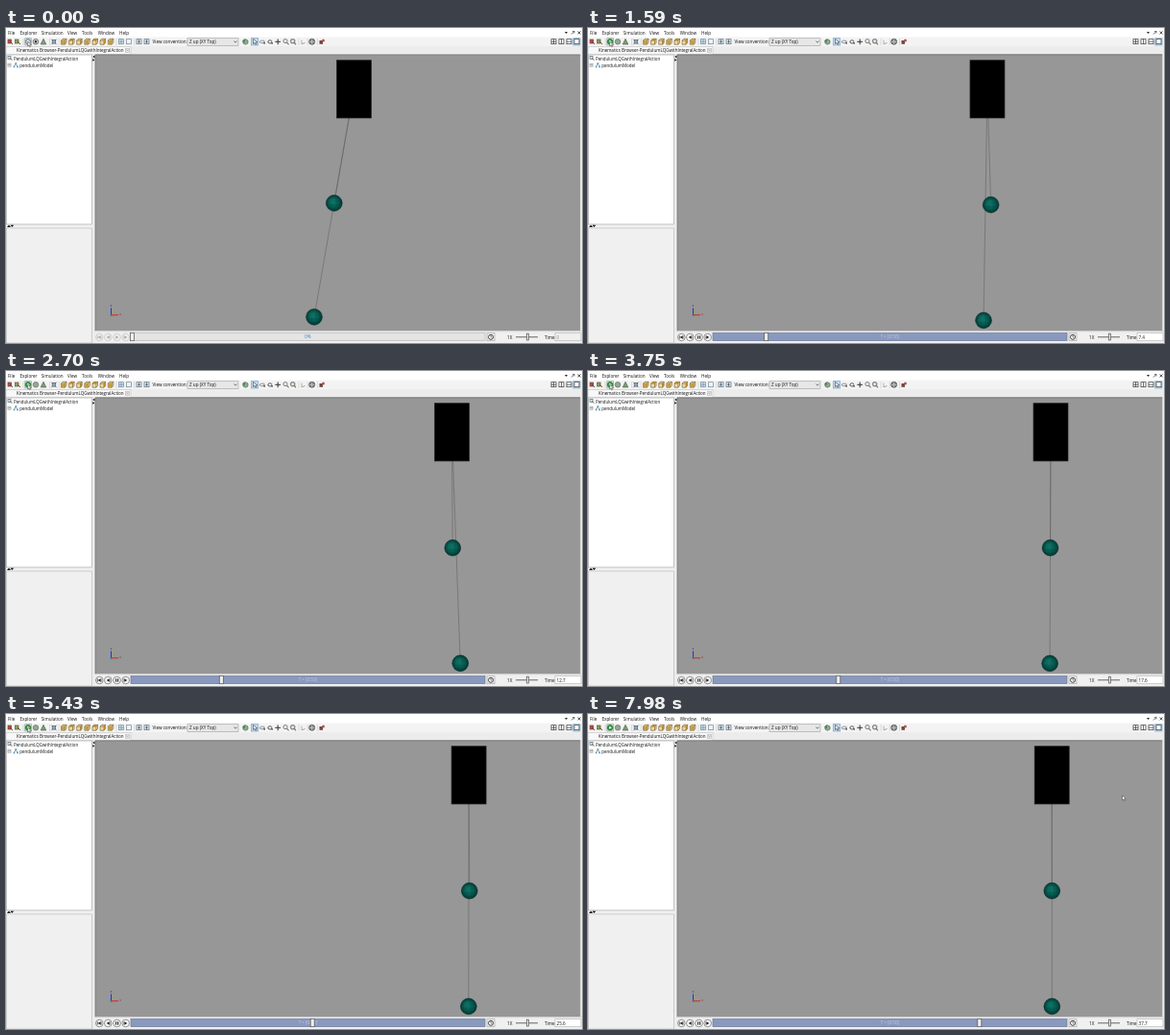
An HTML page with a canvas for the animation above (8.01 s loop, 600 by 329 pixels).

```html
<!DOCTYPE html>
<html lang="en">
<head>
<meta charset="utf-8">
<title>Cart with two pendulums</title>
<style>
html, body { margin: 0; width: 100%; height: 100%; overflow: hidden; background: #f0f0f0; }
canvas { display: block; }
</style>
</head>
<body>
<canvas id="stage" width="600" height="329"></canvas>
<script>
const g = document.getElementById('stage').getContext('2d');
const LOOP = 8010, STEP = 30, PIVOT_Y = 64, ROD = 120.7;
const MODEL = 'PendulumLQGwithIntegralAction';

function box(x, y, w, h, fill, line) {
  if (fill) { g.fillStyle = fill; g.fillRect(x, y, w, h); }
  if (line) { g.strokeStyle = line; g.lineWidth = 0.7; g.strokeRect(x, y, w, h); }
}
function path(pts, line, width = 0.8, fill) {
  g.beginPath();
  for (let i = 0; i < pts.length; i += 2) g.lineTo(pts[i], pts[i + 1]);
  if (fill) { g.closePath(); g.fillStyle = fill; g.fill(); }
  if (line) { g.strokeStyle = line; g.lineWidth = width; g.stroke(); }
}
function disc(x, y, r, fill, line, width = 0.7) {
  g.beginPath();
  g.arc(x, y, r, 0, 7);
  if (fill) { g.fillStyle = fill; g.fill(); }
  if (line) { g.strokeStyle = line; g.lineWidth = width; g.stroke(); }
}
function text(s, x, y, color = '#111', size = 4.6, align = 'left') {
  g.font = size + 'px "Open Sans", "Noto Sans", sans-serif';
  g.textAlign = align;
  g.fillStyle = color;
  g.fillText(s, x, y);
}

// Cart position over simulated seconds, monotone cubic through these knots
const knots = [[0, 362.5], [7.4, 416], [12.7, 464.7], [17.6, 482], [25.7, 482.1], [32.2, 483], [38, 483.2]];
const rate = i => (knots[i + 1][1] - knots[i][1]) / (knots[i + 1][0] - knots[i][0]);
const slopes = knots.map((k, i) => {
  if (!i || i === knots.length - 1) return 0;
  const a = rate(i - 1), b = rate(i);
  return 2 * a * b / (a + b);
});
function cartX(T) {
  let i = 0;
  while (i < knots.length - 2 && T > knots[i + 1][0]) i++;
  const [t0, x0] = knots[i], [t1, x1] = knots[i + 1];
  const h = t1 - t0, u = (T - t0) / h, v = 1 - u;
  return v * v * (1 + 2 * u) * x0 + u * u * (3 - 2 * u) * x1
    + h * u * v * (v * slopes[i] - u * slopes[i + 1]);
}

// Decaying swing plus the forward lean while the cart brakes
function swing(T, start, decay, omega, lean) {
  const u = T / 8;
  return start * Math.exp(-decay * T) * Math.cos(omega * T) + lean * u * u * Math.exp(2 - 2 * u);
}

function cube(x, side) {
  path([x - 2.7, 13, x - 1, 11.3, x + 2.8, 11.3, x + 2.8, 15.3, x + 1.2, 17.2, x - 2.7, 17.2], '#6d5621', 0.6, '#eed9a2');
  path([x - 2.7, 13, x + 1.2, 13, x + 2.8, 11.3], '#6d5621', 0.6);
  path([x + 1.2, 13, x + 1.2, 17.2], '#6d5621', 0.6);
  if (side % 3 === 0) box(x - 2.4, 13.3, 3.4, 3.6, '#c79a3c');
  if (side % 3 === 1) path([x - 2.4, 12.9, x - 1, 11.6, x + 2.4, 11.6, x + 1.1, 12.9], null, 0, '#b98522');
  if (side % 3 === 2) path([x + 1.4, 13.2, x + 2.6, 11.7, x + 2.6, 15.2, x + 1.4, 16.9], null, 0, '#b98522');
}
function pane(x, mode, color = '#555', fill = '#fff') {
  box(x - 2.5, 11.7, 5, 5, fill, color);
  if (mode & 1) path([x, 11.7, x, 16.7], color, 0.7);
  if (mode & 2) path([x - 2.5, 14.2, x + 2.5, 14.2], color, 0.7);
}
function lens(x) {
  path([x + 1, 15, x + 3, 17.3], '#8a6a36', 1.1);
  disc(x - 0.5, 13.6, 2.1, '#e3edf4', '#555');
}
function cursor(x, y) {
  path([x, y, x, y + 5, x + 1.2, y + 4, x + 2, y + 5.8, x + 2.8, y + 5.4, x + 2, y + 3.7, x + 3.5, y + 3.6], '#333', 0.5, '#fff');
}

function menuAndTools(running) {
  box(0, 0, 600, 10, '#fff');
  [['File', 2], ['Explorer', 14.5], ['Simulation', 36.7], ['View', 64], ['Tools', 79], ['Window', 95.7], ['Help', 118]]
    .forEach(([s, x]) => text(s, x, 6.7));
  path([582, 4, 585, 4, 583.5, 6], null, 0, '#222');
  path([589, 6.5, 592, 3.5], '#333', 0.8);
  path([590, 3.5, 592, 3.5, 592, 5.5], '#333', 0.6);
  path([595.7, 3.4, 598.5, 6.4], '#222', 0.8);
  path([598.5, 3.4, 595.7, 6.4], '#222', 0.8);

  box(0, 9.5, 600, 10, '#f3f3f3');
  [18, 45.5, 55.3, 115, 133.7, 305, 314.3, 324.5].forEach(x => path([x, 11, x, 18], '#c9c9c9', 0.6));
  box(2, 12, 3.5, 4, '#c34a35', '#6c4740');
  path([4, 14, 7, 17], '#444', 0.9);
  box(9.5, 12, 3.5, 4, '#7fa35f', '#685339');
  path([12, 14, 15, 17], '#7b4a28', 1);
  if (running) {
    box(19.8, 10.7, 6.8, 7.3, '#dceadf', '#8cab91');
    disc(23, 14.3, 2.8, '#38994a', '#24662f');
    disc(31, 14.3, 2.8, '#91aa92', '#647766');
  } else {
    box(19.8, 10.7, 6.8, 7.3, '#e3e8ee', '#9aa8b5');
    disc(23, 14.3, 2.8, '#b5c1ba', '#5b7281');
    disc(31, 14.3, 2.8, '#d8d8d8', '#444');
    box(29.9, 13.2, 2.2, 2.2, '#222');
  }
  path([22.2, 12.8, 22.2, 15.8, 24.8, 14.3], null, 0, '#fff');
  path([39, 11.3, 36.2, 17, 41.8, 17], '#4f684f', 0.7, running ? '#7e9c73' : '#899a89');
  box(48.2, 12.6, 3.5, 3.5, '#bcd0df', '#3c596f');
  [[47, 11.4], [53, 11.4], [47, 17.4], [53, 17.4]].forEach(([x, y]) => path([x, y, 50, 14.4], '#555', 0.5));
  [60.2, 68.3, 76.4, 84.5, 92.7, 100.8, 109].forEach(cube);
  pane(120, 3, '#6e8ba3', '#d4e3ef');
  pane(128, 0, '#718595', '#eef3f6');
  [138.5, 146.5].forEach(x => {
    pane(x, 1, '#5f7382', '#dce6ed');
    disc(x, 14.2, 1, '#465b69');
  });
  text('View convention:', 152.5, 16.3);
  box(189, 10.7, 53, 7.8, '#e7e7e7', '#aaa');
  text('Z up (XY Top)', 191, 16.3);
  path([237.5, 13.5, 239, 15.2, 240.5, 13.5], '#444', 0.7);
  path([246.7, 13, 249, 11.5, 252, 13, 252, 16, 249.5, 17.3, 247, 16], '#555', 0.6, '#8cae90');
  box(247, 12, 2, 3, '#459251');
  box(255.5, 10.7, 7.2, 7.3, '#c5ddf1', '#71a3ce');
  path([257.5, 11.5, 257.5, 16.5, 259, 15.3, 260, 17.3, 261, 16.8, 260, 15, 261.8, 14.8], '#333', 0.6, '#fff');
  g.strokeStyle = '#555';
  [[267, 2.8, 1.3], [275, 2.2, 1.6]].forEach(([x, rx, ry]) => {
    g.beginPath(); g.ellipse(x, 14.4, rx, ry, 0, 0.4, 6); g.stroke();
    path([x + 1, 15, x + 2.5, 15.2, x + 2, 17], '#333', 0.8);
  });
  path([280.3, 14.3, 286, 14.3], '#333', 1);
  path([283.2, 11.5, 283.2, 17.2], '#333', 1);
  lens(291.5);
  lens(299);
  path([297, 12, 301, 12, 301, 16, 297, 16, 297, 12], '#777', 0.5);
  path([308, 16.8, 308, 12.5], '#809aaa', 0.7);
  path([308, 16.8, 311.5, 15.5], '#aa7064', 0.7);
  disc(318.7, 14.3, 3, '#7d858b', '#444');
  path([318.7, 11.6, 318.7, 17], '#ddd', 0.6);
  path([316, 14.3, 321.5, 14.3], '#ddd', 0.6);
  box(326.5, 13, 3.5, 3.8, '#6b4942');
  disc(330.5, 13, 1.5, '#b55849');
  box(590.8, 10.8, 7.2, 7.2, '#c5ddf1', '#71a3ce');
  [3, 1, 2, 0].forEach((m, i) => pane(570.5 + i * 8, m, '#333'));
}

function panels() {
  box(0, 19.3, 600, 8, '#ececec');
  box(0, 19.5, 130, 7.8, '#f8f8f8', '#c9c9c9');
  text('Kinematics Browser-' + MODEL, 11, 25, '#111', 4.5);
  box(124.5, 21.3, 4, 4, '#eee', '#bbb');
  path([125.5, 22.3, 127.5, 24.3], '#888', 0.5);
  path([127.5, 22.3, 125.5, 24.3], '#888', 0.5);

  box(0, 27.5, 90, 302, '#f0f0f0');
  box(0.4, 28, 89, 177, '#fff', '#aaa');
  box(0.4, 209, 89, 120, '#f0f0f0', '#bcbcbc');
  path([1, 208, 3, 205.7, 5, 208], null, 0, '#111');
  path([4.5, 205.7, 8.2, 205.7, 6.3, 208], null, 0, '#111');
  box(90, 27.5, 3, 302, '#ededed');
  path([92.5, 28.5, 90.3, 30, 92.5, 31.5], null, 0, '#111');
  path([90.3, 32, 92.5, 33.4, 90.3, 34.8], null, 0, '#111');
  box(2, 29.5, 3, 3, '#d9e6ed', '#567389');
  path([4, 31, 6.5, 34], '#8b6436', 0.8);
  text(MODEL, 8, 33.5, '#111', 4.4);
  box(2, 37.2, 3, 3, '#fff', '#999');
  path([2.6, 38.7, 4.5, 38.7], '#333', 0.5);
  path([8.5, 40.5, 10.3, 37, 12, 40.5], '#4c7c9b', 0.7);
  [[8.5, 40.5], [10.3, 37], [12, 40.5]].forEach(([x, y]) => disc(x, y, 0.9, '#5a98bc'));
  text('pendulumModel', 14.3, 40.7, '#111', 4.5);
}

function ball(x, y) {
  const shade = g.createRadialGradient(x - 1.8, y - 2.3, 0.5, x, y, 8.5);
  shade.addColorStop(0, '#12786a');
  shade.addColorStop(0.5, '#086156');
  shade.addColorStop(0.85, '#054a41');
  shade.addColorStop(1, '#042f2a');
  disc(x, y, 8.4, shade, '#0a2926', 0.5);
  g.strokeStyle = 'rgba(0,35,30,.27)';
  g.lineWidth = 0.4;
  for (const r of [2.5, 5.8]) {
    g.beginPath(); g.ellipse(x, y, r, 8.2, 0, 0, 7); g.stroke();
    g.beginPath(); g.ellipse(x, y, 8.2, r, 0, 0, 7); g.stroke();
  }
}

function scene(T) {
  box(93, 27.7, 505.5, 288.8, '#979797');
  path([93, 316.5, 93, 28, 598.5, 28], '#777', 0.8);
  box(598.5, 27, 1.5, 290, '#eee');
  const x = cartX(T);
  const bobs = [
    [swing(T, -20.7, 0.15, 1.1, 1.8), ROD],
    [swing(T, -41.5, 0.155, 0.724, 4), 2 * ROD]
  ].map(([d, len]) => [x + d, PIVOT_Y + Math.sqrt(len * len - d * d)]);
  bobs.forEach(b => path([x, PIVOT_Y, ...b], '#646464', 0.6));
  box(x - 18, 33.7, 36, 60.3, '#000', '#222');
  bobs.forEach(b => ball(...b));

  path([109.5, 299.8, 109.5, 292.5], '#1f32d0', 1);
  path([109.5, 299.8, 117, 299.8], '#d12626', 1);
  disc(109.5, 299.8, 0.9, '#248b32');
  text('z', 109.5, 291, '#24358d', 4, 'middle' && 'center');
  text('x', 118, 300.3, '#a33232', 4);
}

function playbar(T, running) {
  box(93, 316.5, 507, 12.5, '#f0f0f0');
  path([93, 316.8, 600, 316.8], '#c8c8c8', 0.6);
  const ink = running ? '#222' : '#aaa';
  [97.3, 106.3, 115.6, 124.7].forEach((x, i) => {
    disc(x, 323, 3.8, running ? '#f8f8f8' : '#eee', running ? '#666' : '#c3c3c3');
    if (i === 2 && running) {
      box(x - 1.5, 321.3, 1.1, 3.4, ink);
      box(x + 0.5, 321.3, 1.1, 3.4, ink);
    } else {
      const s = i < 2 ? -1 : 1;
      path([x - s * 1.3, 321.2, x + s * 1.6, 323, x - s * 1.3, 324.8], null, 0, ink);
      if (i !== 2) path([x - s * 1.8, 321.3, x - s * 1.8, 324.7], ink, 0.6);
      if (i === 0) path([x - 2, 321.3, x - 2, 324.7], ink, 0.7);
    }
  });
  box(130, 318.6, 369, 8, running ? '#8998bd' : '#e4e4e4', running ? '#697899' : '#b8b8b8');
  if (running) text('T = [0:50]', 314.3, 324.4, '#c5cde0', 4.5, 'center');
  else text('0%', 314.3, 324.4, '#3e81bd', 4.6, 'center');
  box(129.5 + 7.33 * T, 318.3, 4, 8.4, '#eee', '#555');

  box(501, 318.7, 8, 8, '#eee', '#aaa');
  disc(505, 322.8, 2.5, '#fff', '#333', 0.9);
  path([505, 321, 505, 323, 506.5, 323], '#333', 0.6);
  text('1X', 522, 324.7, '#111', 4.6);
  path([531, 322.8, 554, 322.8], '#555', 0.9);
  box(542.3, 319.2, 2.3, 6.8, '#e5e5e5', '#555');
  text('Time', 561, 324.7, '#111', 4.6);
  box(572, 318.7, 27, 8, running ? '#fff' : '#f0f0f0', '#b7b7b7');
  text(String(+T.toFixed(1)), 573.5, 324.7, running ? '#111' : '#888', 4.6);
}

function draw(now) {
  const t = Math.floor(now % LOOP / STEP) * STEP;
  const running = t >= STEP;
  const T = Math.max(0, t - STEP) * 0.004742;
  menuAndTools(running);
  panels();
  scene(T);
  playbar(T, running);
  const u = Math.min(1, Math.max(0, (t - 7440) / 480)), ease = u * u * (3 - 2 * u);
  cursor(22.7 + 533.8 * ease, 14 + 71 * ease);
  requestAnimationFrame(draw);
}
requestAnimationFrame(draw);
</script>
</body>
</html>
```
